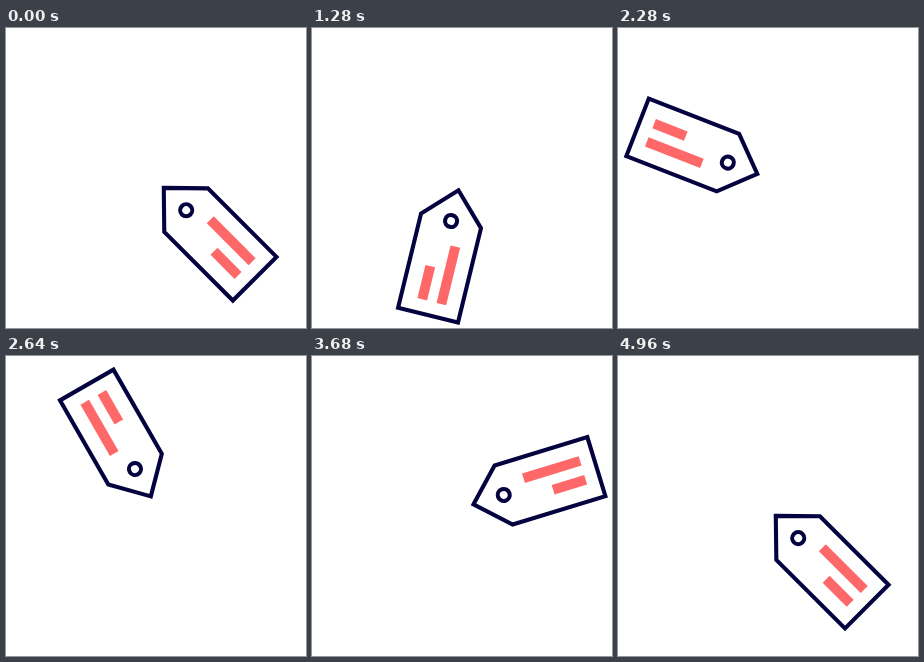
Recreate the animation shown at these times as an HTML page. Size 300 by 300 pixels, loop 5000 ms.

```html
<!DOCTYPE html>
<html lang="en">
<head>
<meta charset="utf-8">
<title>Spinning tag</title>
<style>
  html, body { margin: 0; width: 100%; height: 100%; overflow: hidden; background: #fff; }
  svg { display: block; width: 100vw; height: 100vh; }
  .line { fill: #fff; stroke: #05033f; stroke-width: 4.1; }
  .bar { fill: #ff6868; }
</style>
</head>
<body>
<svg viewBox="0 0 300 300">
  <!-- The tag lies along the x axis with the pivot at 0,0 -->
  <g id="tag" transform="translate(150 151) rotate(45)">
    <path class="line" d="M11.8 .8 L43.3 -30.1 H140.3 V31.6 H43.3 Z"/>
    <circle class="line" cx="43.4" cy=".7" r="6"/>
    <rect class="bar" x="67.2" y="-14.5" width="59.2" height="9.9"/>
    <rect class="bar" x="92.2" y="5.2" width="34" height="9.9"/>
  </g>
</svg>
<script>
  const LOOP = 5000, STEP = 40, START = 45;
  const tag = document.getElementById('tag');
  const ease = p => p * p * (3 - 2 * p);

  function draw() {
    const t = Math.floor(performance.now() % LOOP / STEP) * STEP;
    const angle = START + 360 * ease(t / LOOP);
    tag.setAttribute('transform', `translate(150 151) rotate(${angle})`);
    requestAnimationFrame(draw);
  }
  draw();
</script>
</body>
</html>
```
